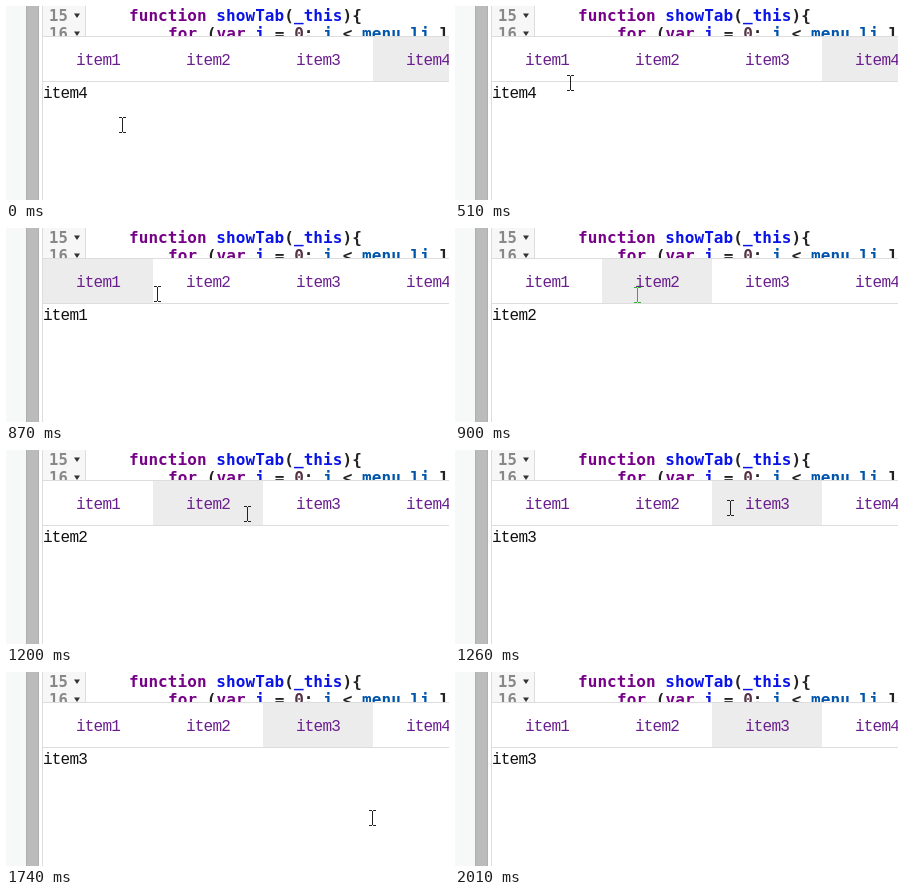
These frames come from a looping animation (443x194 px, 2280 ms). An HTML page:

```html
<!DOCTYPE html>
<html lang="en">
<head>
<meta charset="utf-8">
<title>Tab menu</title>
<style>
  html, body { margin: 0; width: 100%; height: 100%; overflow: hidden; background: #fff; }
  svg { display: block; width: 443px; height: 194px; }
  text { white-space: pre; }
  .code, .num { font: bold 16px "DejaVu Sans Mono", monospace; letter-spacing: .07px; fill: #222; }
  .num { font-size: 15.5px; fill: #888; }
  .item { font: 16px "Liberation Mono", monospace; letter-spacing: -.8px; fill: #111; }
  .link { fill: #6b1f8f; }
  .key { fill: #708; }
  .def { fill: #0a14e6; }
  .local { fill: #05a; }
  .val { fill: #534; }
</style>
</head>
<body>
<svg viewBox="0 0 443 194">
  <rect width="20" height="194" fill="#f7f9f8"/>
  <rect x="20" width="13" height="194" fill="#bbb"/>
  <path d="M20.5 0v194M32.5 0v194" stroke="#b0b0b0"/>
  <rect x="36" width="1" height="194" fill="#ddd"/>
  <rect x="37" width="42" height="30" fill="#f7f7f7"/>
  <rect x="79" width="1" height="30" fill="#ddd"/>
  <svg width="443" height="30">
    <text class="num" x="43" y="15">15</text>
    <text class="num" x="43" y="33">16</text>
    <path d="M68 7.5h6l-3 4.5zM68 25.5h6l-3 4.5z" fill="#333"/>
    <text class="code" x="123" y="15"><tspan class="key">function</tspan> <tspan class="def">showTab</tspan>(<tspan class="def">_this</tspan>){</text>
    <text class="code" x="162" y="33"><tspan class="key">for</tspan> (<tspan class="key">var</tspan> <tspan class="def">i</tspan> = <tspan class="val">0</tspan>; <tspan class="local">i</tspan> &lt; <tspan class="local">menu_li</tspan>.length</text>
  </svg>
  <rect x="37" y="30" width="406" height="1" fill="#ddd"/>
  <rect id="hover" y="31" width="110" height="44" fill="#ececec"/>
  <g id="tabs"></g>
  <rect x="37" y="75" width="406" height="1" fill="#ddd"/>
  <text id="panel" class="item" x="37" y="92"></text>
  <path id="beam" d="M-3.5 -7.5h3M.5 -7.5h3M0 -7v14M-3.5 7.5h3M.5 7.5h3" fill="none" stroke="#222"/>
</svg>
<script>
  const LOOP = 2280, STEP = 30, EXIT = 2010, FLASH = 900;
  const TAB_X = 37, TAB_W = 110, BAR_BOTTOM = 76;

  const smooth = u => u * u * (3 - 2 * u);
  const out = power => u => 1 - (1 - u) ** power;

  const origin = { x: 116, y: 119 };
  // pointer moves, each starting where the one before ended
  const moves = [
    { from: 300, to: 810, x: 115, y: 66, ease: out(3) },
    { from: 810, to: 960, x: 218, y: 67, ease: smooth },
    { from: 1130, to: 1330, x: 298, y: 55, ease: smooth },
    { from: 1530, to: EXIT, x: 423, y: 192, ease: out(1.35), easeY: out(1.9) }
  ];

  const $ = id => document.getElementById(id);
  const hover = $("hover"), panel = $("panel"), beam = $("beam");

  for (let i = 0; i < 4; i++) {
    const label = document.createElementNS("http://www.w3.org/2000/svg", "text");
    label.setAttribute("class", "item link");
    label.setAttribute("x", TAB_X + TAB_W * i + 33);
    label.setAttribute("y", 59);
    label.textContent = "item" + (i + 1);
    $("tabs").append(label);
  }

  function pointer(t) {
    let { x, y } = origin;
    for (const m of moves) {
      const u = Math.min(1, Math.max(0, (t - m.from) / (m.to - m.from)));
      x += (m.x - x) * m.ease(u);
      y += (m.y - y) * (m.easeY || m.ease)(u);
    }
    return { x: Math.round(x), y: Math.round(y) };
  }

  // the last tab the pointer touched, one step late
  function selected(t) {
    for (let s = t - STEP; s >= 0; s -= STEP) {
      const { x, y } = pointer(s);
      if (y < BAR_BOTTOM) return Math.floor((x - TAB_X) / TAB_W) + 1;
    }
    return 4;
  }

  function draw(now) {
    const t = Math.floor((now % LOOP) / STEP) * STEP;
    const tab = selected(t);
    const { x, y } = pointer(t);
    hover.setAttribute("x", TAB_X + TAB_W * (tab - 1));
    panel.textContent = "item" + tab;
    beam.setAttribute("transform", `translate(${x + .5} ${y})`);
    beam.setAttribute("stroke", t === FLASH ? "#2db52d" : "#222");
    beam.style.display = t < EXIT ? "" : "none";
  }

  const start = performance.now();
  function tick() {
    draw(performance.now() - start);
    requestAnimationFrame(tick);
  }
  tick();
</script>
</body>
</html>
```
